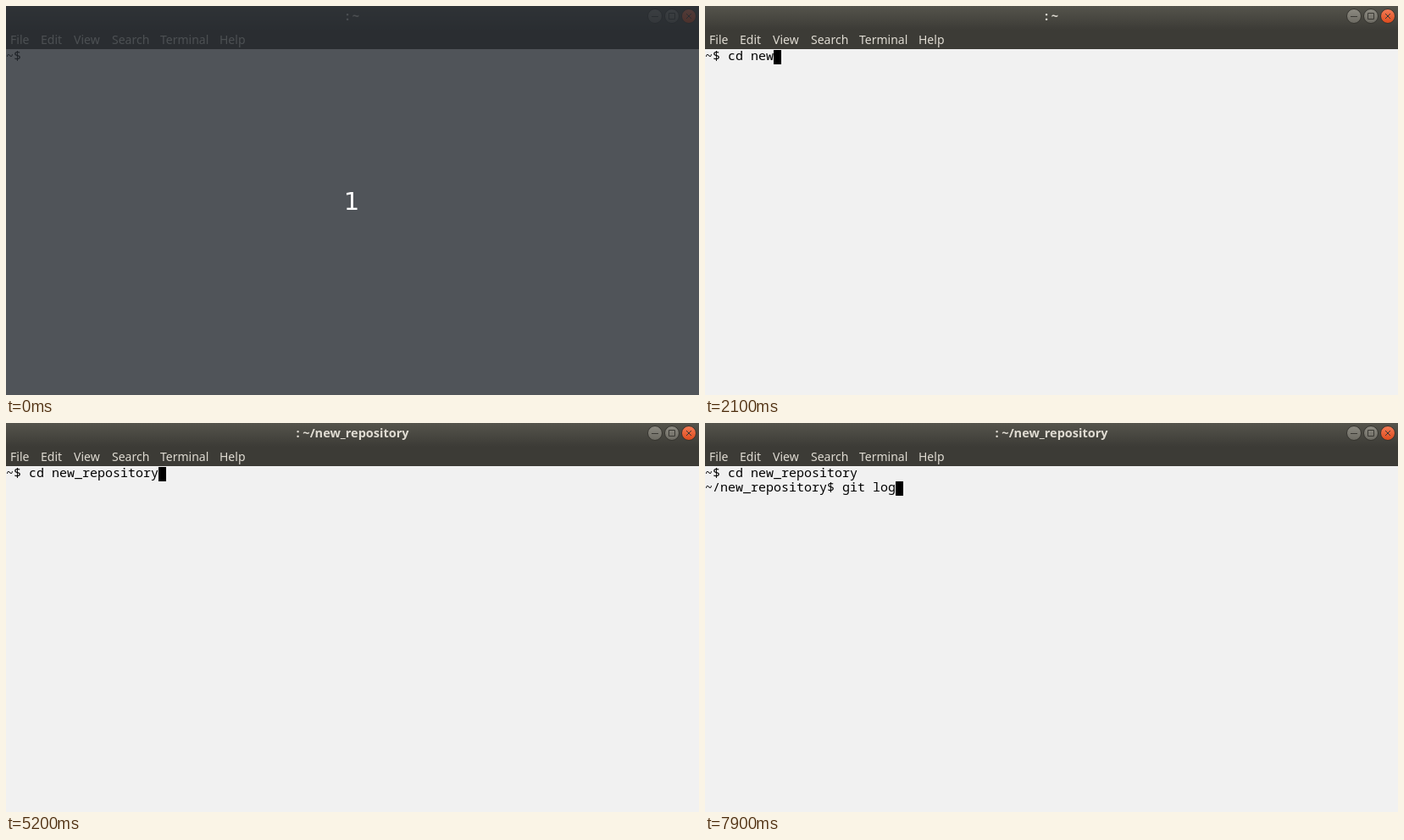
These frames come from a looping animation (818x460 px, 8 s). An HTML page:

```html
<!DOCTYPE html>
<html lang="en">
<head>
<meta charset="utf-8">
<title>Terminal</title>
<style>
  html, body { margin: 0; width: 100%; height: 100%; overflow: hidden; background: #f1f1f1; }
  svg { display: block; width: 100%; height: 100%; }
  text { white-space: pre; }
  .bar { font: 14px "Noto Sans", sans-serif; fill: #dfdbd2; }
  .title { font: bold 14.5px "Noto Sans", sans-serif; fill: #dfdbd2; text-anchor: middle; }
  .mono { font: 15px "Noto Sans Mono", monospace; fill: #000; }
  .count { font: 29px "DejaVu Sans", sans-serif; fill: #fff; text-anchor: middle; }
  .sign { fill: none; stroke: #3a3934; stroke-width: 1; }
</style>
</head>
<body>
<svg viewBox="0 0 818 460">
  <defs>
    <linearGradient id="head" x2="0" y2="1">
      <stop stop-color="#55544c"/>
      <stop offset="1" stop-color="#3c3b36"/>
    </linearGradient>
    <linearGradient id="gray" x2="0" y2="1">
      <stop stop-color="#8d8b82"/>
      <stop offset="1" stop-color="#6b6961"/>
    </linearGradient>
    <linearGradient id="red" x2="0" y2="1">
      <stop stop-color="#f47c57"/>
      <stop offset="1" stop-color="#dd4a1c"/>
    </linearGradient>
  </defs>

  <rect width="818" height="460" fill="#f1f1f1"/>
  <rect width="818" height="51" fill="#3c3b36"/>
  <rect width="818" height="28" fill="url(#head)"/>
  <text id="title" class="title" x="409" y="17"></text>

  <g stroke="#34332e">
    <circle cx="766" cy="12" r="8.5" fill="url(#gray)"/>
    <circle cx="786" cy="12" r="8.5" fill="url(#gray)"/>
    <circle cx="806" cy="12" r="8.5" fill="url(#red)"/>
  </g>
  <path class="sign" d="M762 12.5h8M782.5 8.5h7v7h-7zM803 9l6 6m0-6l-6 6"/>

  <g class="bar">
    <text x="5" y="45">File</text>
    <text x="41" y="45">Edit</text>
    <text x="80" y="45">View</text>
    <text x="125" y="45">Search</text>
    <text x="182" y="45">Terminal</text>
    <text x="252" y="45">Help</text>
  </g>

  <text id="line0" class="mono" x="0" y="64"></text>
  <text id="line1" class="mono" x="0" y="81"></text>
  <rect id="cursor" width="9" height="17"/>

  <g id="intro">
    <rect width="818" height="460" fill="#252a31" opacity=".79"/>
    <text class="count" x="408" y="241">1</text>
  </g>
</svg>
<script>
  const LOOP = 8000, CELL = 9, ROW = 17, TOP = 52;
  const INTRO_END = 300, TITLE_AT = 5200, ENTER_AT = 5500;
  const HIDDEN = [[0, 300], [900, 1100], [5800, 6400]];

  // One key time per typed character
  const lines = [
    { prompt: '~$ ', input: 'cd new_repository', keys: [
      1300, 1300, 1500, 1900, 2000, 2100, 2900, 3000, 3500,
      3700, 3900, 4000, 4100, 4500, 4600, 4600, 5000] },
    { prompt: '~/new_repository$ ', input: 'git log', keys: [
      6500, 6600, 6700, 7000, 7500, 7800, 7900] }
  ];

  const el = id => document.getElementById(id);
  const show = (node, on) => node.setAttribute('visibility', on ? 'visible' : 'hidden');
  const setText = (node, s) => { if (node.textContent !== s) node.textContent = s; };
  const typed = ({ prompt, input, keys }, t) =>
    prompt + input.slice(0, keys.filter(k => k <= t).length);

  const title = el('title'), cursor = el('cursor'), intro = el('intro');
  const rows = [el('line0'), el('line1')];

  function render(t) {
    const row = t < ENTER_AT ? 0 : 1;
    const text = lines.map((line, i) => i <= row ? typed(line, t) : '');
    rows.forEach((node, i) => setText(node, text[i]));
    setText(title, t < TITLE_AT ? ': ~' : ': ~/new_repository');
    cursor.setAttribute('x', text[row].length * CELL);
    cursor.setAttribute('y', TOP + row * ROW);
    show(cursor, !HIDDEN.some(([from, to]) => t >= from && t < to));
    show(intro, t < INTRO_END);
  }

  const start = performance.now();
  function tick() {
    render((performance.now() - start) % LOOP);
    requestAnimationFrame(tick);
  }
  tick();
</script>
</body>
</html>
```
